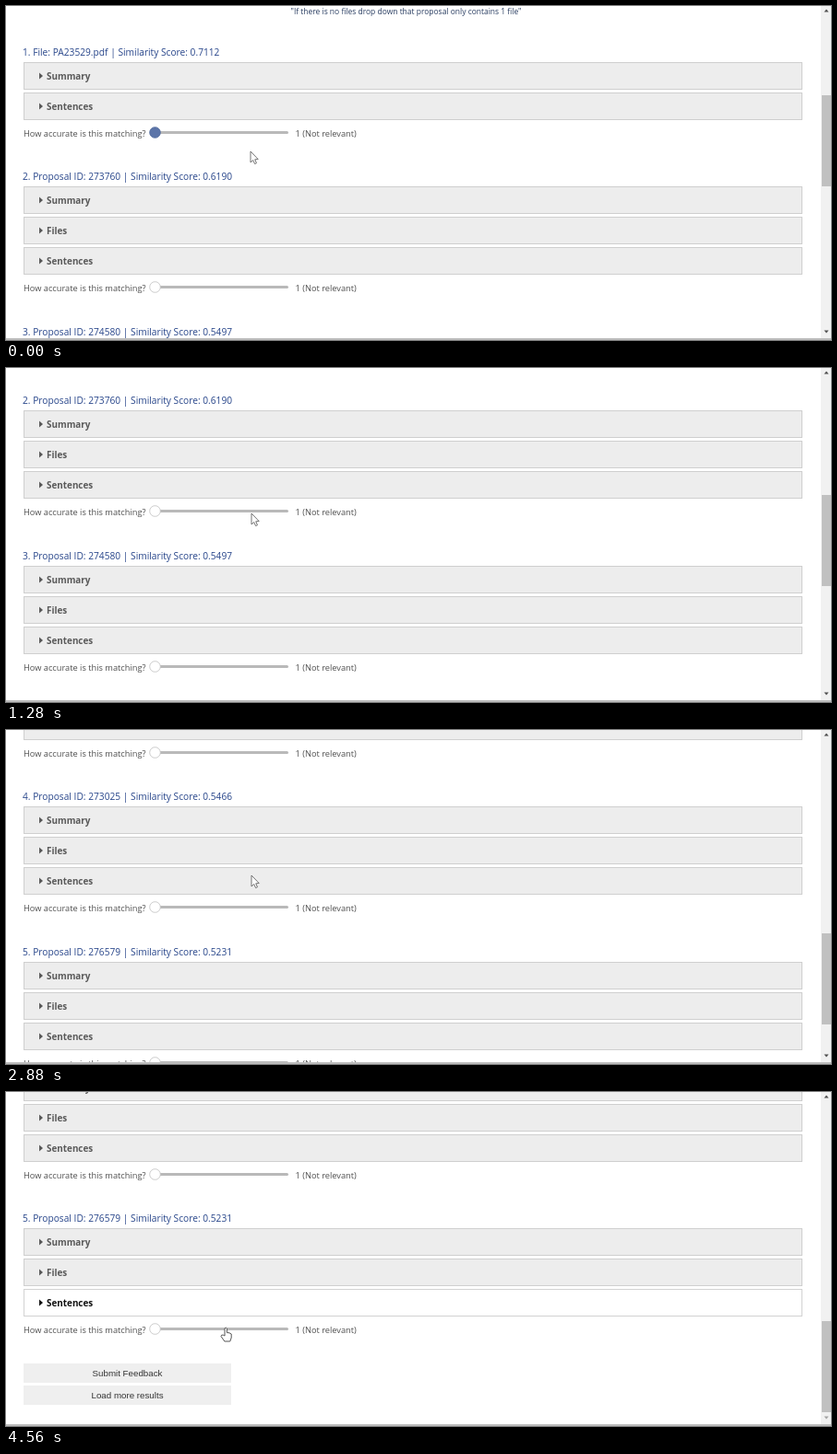
These frames come from a looping animation (894 by 363 pixels, 4.64 s). An HTML page with a canvas:

```html
<!DOCTYPE html>
<html lang="en">
<head>
<meta charset="utf-8">
<title>Similarity results</title>
<style>
  html, body { margin: 0; width: 100%; height: 100%; overflow: hidden; background: #fff; }
  canvas { display: block; width: 894px; height: 363px; }
</style>
</head>
<body>
<canvas id="stage" width="894" height="363"></canvas>
<script>
const ctx = document.getElementById('stage').getContext('2d');
const W = 894, H = 363, LOOP = 4640, TICK = 80;

const SANS = '"Open Sans", "Noto Sans", sans-serif';
const FONT = {
  note: '8.47px ' + SANS,
  title: '10.2px ' + SANS,
  row: 'bold 9.9px ' + SANS,
  label: '9.25px ' + SANS,
  button: '9.75px "Liberation Sans", Arial, sans-serif'
};

const PITCH = 168.45, ROW_PITCH = 33, ROW_H = 30;
const items = [
  { name: 'File: PA23529.pdf', score: '0.7112', y: 50, rows: ['Summary', 'Sentences'], rated: true },
  ...[['273760', '0.6190'], ['274580', '0.5497'], ['273025', '0.5466'], ['276579', '0.5231']]
    .map(([id, score], i) => ({
      name: 'Proposal ID: ' + id, score, y: 185.3 + i * PITCH,
      rows: ['Summary', 'Files', 'Sentences']
    }))
];

// Each wheel notch scrolls one step, eased out.
const NOTCHES = [285, 880, 1300, 1600, 2040, 2500, 2960, 3460];
const NOTCH_MS = 280, STEP = 75, SCROLL_MAX = 553.4;

const clamp01 = v => Math.max(0, Math.min(1, v));
const easeOut = u => 1 - (1 - u) ** 2;

function scrollAt(t) {
  const sum = NOTCHES.reduce((s, start) => s + STEP * easeOut(clamp01((t - start) / NOTCH_MS)), 0);
  return Math.min(SCROLL_MAX, sum);
}

function pointerAt(t) {
  if (t < 80) return { x: 265, y: 158 };
  if (t >= 4560) return { x: 238, y: 256 };
  const u = clamp01((t - 3920) / 480);
  return { x: 266 - 26 * u, y: 158 + 76 * u };
}

function hoverAt(t) {
  if (t < 4000) return -1;
  return t < 4080 ? 0 : t < 4240 ? 1 : 2;
}

function text(str, x, y, font, color, align = 'left') {
  ctx.font = font;
  ctx.fillStyle = color;
  ctx.textAlign = align;
  ctx.fillText(str, x, y);
}

function rect(x, y, w, h, color) {
  ctx.fillStyle = color;
  ctx.fillRect(x, y, w, h);
}

function poly(points, fill, stroke) {
  ctx.beginPath();
  points.forEach(([x, y]) => ctx.lineTo(x, y));
  ctx.closePath();
  ctx.fillStyle = fill;
  ctx.fill();
  if (stroke) {
    ctx.strokeStyle = stroke;
    ctx.lineWidth = 0.9;
    ctx.stroke();
  }
}

function drawRow(label, y, hot) {
  rect(19, y, 844, ROW_H, hot ? '#d2d2d2' : '#cfcfcf');
  rect(20, y + 1, 842, ROW_H - 2, hot ? '#fff' : '#ededed');
  const color = hot ? '#111' : '#595959', mid = y + 15;
  poly([[36, mid - 3.5], [40, mid], [36, mid + 3.5]], color);
  text(label, 44, mid + 4, FONT.row, color);
}

function drawSlider(y, rated) {
  text('How accurate is this matching?', 19, y + 4, FONT.label, '#505050');
  ctx.fillStyle = '#b9b9b9';
  ctx.beginPath();
  ctx.roundRect(160, y - 2, 146, 3, 1.5);
  ctx.fill();
  ctx.beginPath();
  ctx.arc(161.5, y - 0.5, 5.8, 0, Math.PI * 2);
  ctx.fillStyle = rated ? '#5b74a8' : '#fff';
  ctx.fill();
  ctx.strokeStyle = rated ? '#536c9f' : '#c6c6c6';
  ctx.lineWidth = 0.9;
  ctx.stroke();
  text('1 (Not relevant)', 313.5, y + 4, FONT.label, '#505050');
}

function drawItem(item, index, scroll, hovered) {
  const y = Math.round(item.y - scroll);
  if (y > H + 10 || y < -160) return;
  text(`${index + 1}. ${item.name} | Similarity Score: ${item.score}`, 18, y + 4, FONT.title, '#27458a');
  item.rows.forEach((label, i) => drawRow(label, y + 11 + i * ROW_PITCH, i === hovered));
  drawSlider(y + 22 + item.rows.length * ROW_PITCH, item.rated);
}

function drawButton(label, y) {
  rect(19, y, 225, 21, '#efefef');
  text(label, 131.5, y + 14, FONT.button, '#333', 'center');
}

function drawScrollbar(scroll) {
  rect(883, 0, 11, H, '#f1f1f1');
  rect(884, Math.round(97 + scroll * 0.2745), 10, 99, '#c0c0c0');
  const atEnd = scroll >= SCROLL_MAX;
  poly([[886.5, 6.5], [889, 3.5], [891.5, 6.5]], '#505050');
  poly([[886.5, 352.5], [889, 355.5], [891.5, 352.5]], atEnd ? '#a3a3a3' : '#505050');
  rect(0, 361, W, 2, '#bdbdbd');
}

function drawArrow() {
  poly([[0, 0], [0, 12], [2.7, 9.5], [4.6, 13.6], [6.5, 12.7], [4.7, 8.8], [8.2, 8.5]], '#fff', '#666');
}

function drawHand() {
  ctx.beginPath();
  ctx.moveTo(-1, 9);
  ctx.lineTo(-1, 1);
  ctx.quadraticCurveTo(0.2, -1, 1.4, 1);
  ctx.lineTo(1.4, 5.5);
  ctx.lineTo(4, 5.8);
  ctx.lineTo(6.2, 7);
  ctx.lineTo(6.2, 11);
  ctx.lineTo(4.8, 15);
  ctx.lineTo(-1.2, 15);
  ctx.lineTo(-5, 9.5);
  ctx.quadraticCurveTo(-4.4, 7.2, -2.6, 8.2);
  ctx.closePath();
  ctx.fillStyle = '#fff';
  ctx.strokeStyle = '#555';
  ctx.lineWidth = 1;
  ctx.fill();
  ctx.stroke();
}

function render(t) {
  const scroll = scrollAt(t), hovered = hoverAt(t), pointer = pointerAt(t);
  rect(0, 0, W, H, '#fff');
  text('"If there is no files drop down that proposal only contains 1 file"',
    433.5, Math.round(9 - scroll), FONT.note, '#2b3f63', 'center');
  items.forEach((item, i) => drawItem(item, i, scroll, i === items.length - 1 ? hovered : -1));
  drawButton('Submit Feedback', Math.round(848.6 - scroll));
  drawButton('Load more results', Math.round(872.6 - scroll));
  drawScrollbar(scroll);
  ctx.save();
  ctx.translate(pointer.x, pointer.y);
  (hovered < 0 ? drawArrow : drawHand)();
  ctx.restore();
}

const begin = performance.now();
function frame() {
  const t = (performance.now() - begin) % LOOP;
  render(Math.floor(t / TICK) * TICK);
  requestAnimationFrame(frame);
}
frame();
</script>
</body>
</html>
```
